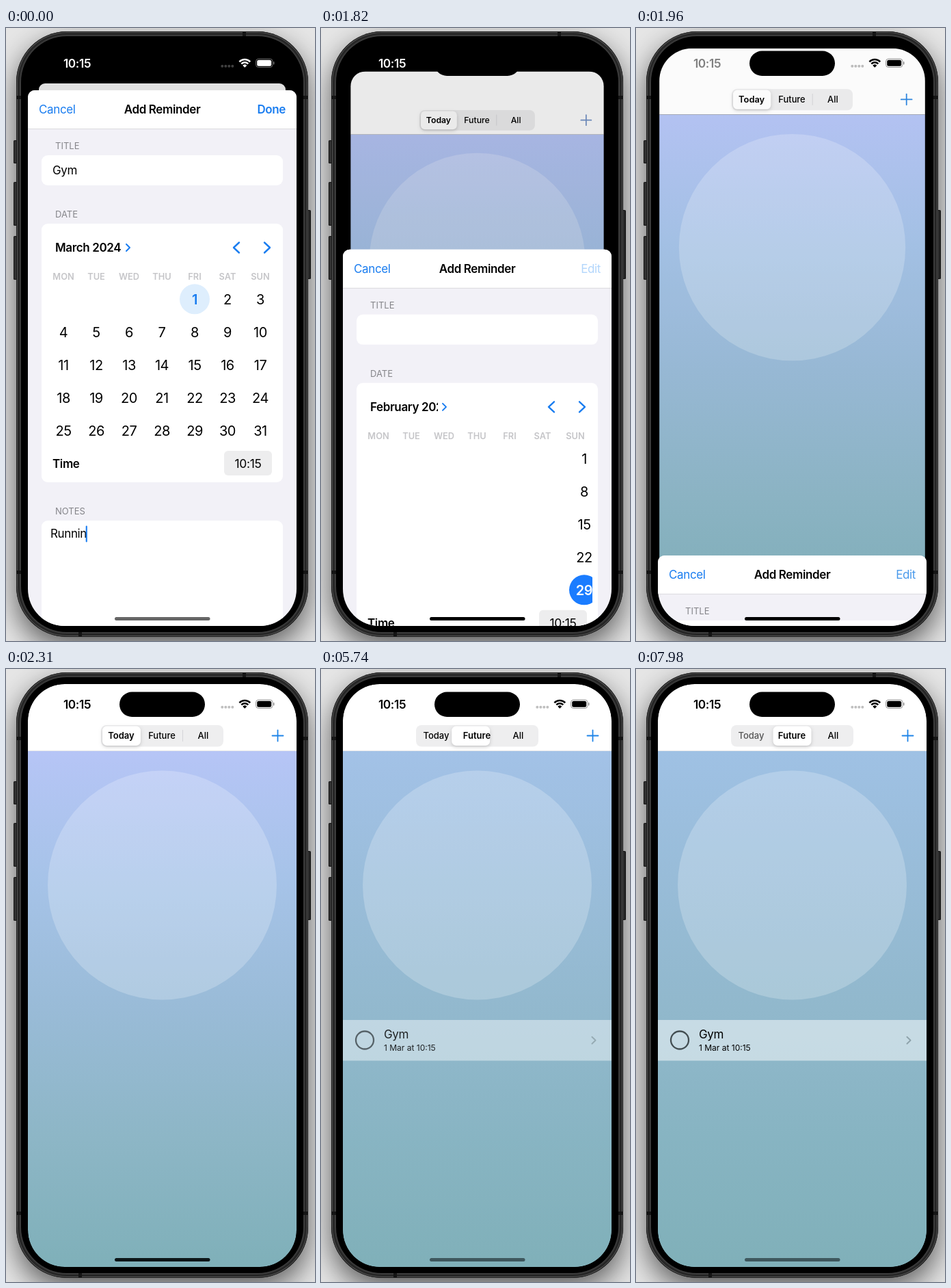
An HTML page with a canvas for the animation above (8 s loop, 452x896 px).

```html
<!DOCTYPE html>
<html lang="en">
<head>
<meta charset="utf-8">
<title>Reminders</title>
<style>
  html, body { margin: 0; width: 100%; height: 100%; overflow: hidden; background: #ddd; }
  canvas { display: block; }
</style>
</head>
<body>
<canvas id="stage" width="452" height="896"></canvas>
<script>
const ctx = document.getElementById('stage').getContext('2d');
const LOOP = 8000, STEP = 70;
const BLUE = '#1a7df0';
const MID = 228.5;

const clamp = v => Math.max(0, Math.min(1, v));
const lerp = (a, b, p) => a + (b - a) * p;
const mix = (a, b, p) => `rgb(${a.map((v, i) => Math.round(lerp(v, b[i], p)))})`;

// Critically damped spring from 0 to 1; time in ms, speed per second
function spring(ms, speed) {
  const x = Math.max(0, ms) * speed / 1000;
  return 1 - (1 + x) * Math.exp(-x);
}

function box(x, y, w, h, r, fill) {
  ctx.beginPath();
  ctx.roundRect(x, y, w, h, r);
  if (fill) {
    ctx.fillStyle = fill;
    ctx.fill();
  }
}

function disc(x, y, r, fill) {
  ctx.beginPath();
  ctx.arc(x, y, r, 0, 7);
  ctx.fillStyle = fill;
  ctx.fill();
}

function line(points, color, width) {
  ctx.beginPath();
  points.forEach(([x, y]) => ctx.lineTo(x, y));
  ctx.strokeStyle = color;
  ctx.lineWidth = width;
  ctx.lineCap = ctx.lineJoin = 'round';
  ctx.stroke();
}

// y is the middle of the capital letters
function text(str, x, y, size, weight = 400, color = '#000', align = 'left') {
  ctx.font = `${weight} ${size}px Inter, sans-serif`;
  ctx.letterSpacing = (size > 13 ? -0.022 * size : 0) + 'px';
  ctx.textAlign = align;
  ctx.fillStyle = color;
  ctx.fillText(str, x, y + size * 0.364);
}

// dir 1 points right, -1 points left
function chevron(x, y, w, h, dir, color, width) {
  line([[x - w * dir, y - h], [x + w * dir, y], [x - w * dir, y + h]], color, width);
}

function clipped(path, draw) {
  ctx.save();
  path();
  ctx.clip();
  draw();
  ctx.restore();
}

function gradient(colors) {
  const g = ctx.createLinearGradient(0, 120, 0, 874);
  colors.forEach((c, i) => g.addColorStop(i / (colors.length - 1), c));
  return g;
}
const todaySky = gradient(['#b6c5f6', '#a6c3e8', '#99bbd7', '#8db6c6', '#7fb0b9']);
const futureSky = gradient(['#9fc1e4', '#98bcd8', '#91b8cc', '#87b4c2', '#80b0b9']);

function drawPhone() {
  ctx.fillStyle = '#e6e6e6';
  ctx.fillRect(0, 0, 452, 896);
  ctx.save();
  ctx.shadowColor = 'rgba(0,0,0,.6)';
  ctx.shadowBlur = 42;
  ctx.shadowOffsetY = 16;
  box(15, 5, 427, 885, 74, '#222');
  ctx.restore();
  for (const [x, y, h] of [[11, 164, 34], [11, 225, 64], [11, 304, 64], [440, 266, 101]]) {
    box(x, y, 6, h, 1.5, '#1b1b1b');
    box(x + 1.5, y + 1, 2, h - 2, 1, '#3c3c3c');
  }
  box(15, 5, 427, 885, 74, '#1a1a1a');
  box(16, 6, 425, 883, 73, '#555');
  box(17, 7, 423, 881, 72, '#262626');
  box(20, 10, 417, 875, 69, '#3b3b3b');
  box(22, 12, 413, 871, 67, '#000');
  ctx.fillStyle = '#141414';
  for (const y of [99, 793]) {
    ctx.fillRect(16, y, 6, 5);
    ctx.fillRect(435, y, 6, 5);
  }
  ctx.fillRect(346, 6, 5, 6);
  ctx.fillRect(106, 883, 5, 6);
}

function drawSegments(t, p) {
  box(139, 82, 179, 31.5, 8, '#eeeeef');
  if (p < 0.5) {
    ctx.fillStyle = '#d5d5d8';
    ctx.fillRect(258, 89, 1, 17);
  }
  ctx.save();
  ctx.shadowColor = 'rgba(0,0,0,.18)';
  ctx.shadowBlur = 5;
  ctx.shadowOffsetY = 2;
  box(lerp(141, 200.5, p), 83.5, 56, 28.5, 6.5, '#fff');
  ctx.restore();
  const pressed = '#555';
  text('Today', 168.5, 97.7, 13, p < 0.5 ? 600 : 500, t >= 7980 ? pressed : '#000', 'center');
  text('Future', 228, 97.7, 13, p < 0.5 ? 500 : 600, t >= 5530 && p < 0.5 ? pressed : '#000', 'center');
  text('All', 288.5, 97.7, 13, 500, '#000', 'center');
}

function drawList(t, open, future) {
  ctx.fillStyle = '#fff';
  ctx.fillRect(32, 22, 393, 98);
  ctx.fillStyle = todaySky;
  ctx.fillRect(32, 120, 393, 754);
  ctx.globalAlpha = future;
  ctx.fillStyle = futureSky;
  ctx.fillRect(32, 120, 393, 754);
  ctx.globalAlpha = 1;
  ctx.fillStyle = 'rgba(0,0,0,.12)';
  ctx.fillRect(32, 119.3, 393, 0.7);
  disc(MID, 316, 167.5, 'rgba(255,255,255,.22)');
  drawSegments(t, future);

  const tint = mix([151, 153, 187], [30, 132, 232], open);
  line([[389.5, 97.5], [405.5, 97.5]], tint, 1.8);
  line([[397.5, 89.5], [397.5, 105.5]], tint, 1.8);

  ctx.globalAlpha = future;
  ctx.fillStyle = 'rgba(255,255,255,.5)';
  ctx.fillRect(32, 513, 393, 59.5);
  ctx.beginPath();
  ctx.arc(64, 542.5, 13, 0, 7);
  ctx.strokeStyle = '#434e52';
  ctx.lineWidth = 2.3;
  ctx.stroke();
  text('Gym', 92, 534, 17);
  text('1 Mar at 10:15', 92, 554, 12);
  chevron(399, 542.7, 2.6, 5, 1, '#8fa3ab', 1.9);
  ctx.globalAlpha = 1;
}

function drawCalendar(t, reset) {
  const column = i => 84 + 48 * i;
  const row = i => 396.5 + 48 * i;
  if (reset) {
    clipped(() => box(60, 300, 111, 40, 0), () => text('February 2024', 72, 321, 17, 600));
  } else {
    text('March 2024', 72, 321, 17, 600);
  }
  chevron(reset ? 180.5 : 178.5, 321, 2.5, 5, 1, BLUE, 2);
  chevron(337, 321, 4, 7.5, -1, BLUE, 2.4);
  chevron(382, 321, 4, 7.5, 1, BLUE, 2.4);
  ['MON', 'TUE', 'WED', 'THU', 'FRI', 'SAT', 'SUN'].forEach((name, i) =>
    text(name, column(i), 363.5, 12.8, 600, '#c5c5c8', 'center'));

  if (reset) {
    // The previous month slides in, one column showing
    const x = 385 + (1820 - t) * 0.4;
    clipped(() => box(60, 370, 337, 245, 0), () => {
      disc(x, row(4), 22, '#1a7cff');
      for (let i = 0; i < 5; i++) {
        text(1 + 7 * i, x, row(i), 20, i < 4 ? 400 : 600, i < 4 ? '#000' : '#fff', 'center');
      }
    });
  } else {
    disc(276, 396.3, 22, '#deeefd');
    for (let day = 1; day <= 31; day++) {
      const cell = day + 3, first = day === 1;
      text(day, column(cell % 7), row(Math.floor(cell / 7)), 20,
        first ? 600 : 400, first ? BLUE : '#000', 'center');
    }
  }
  text('Time', 68, 636.5, 17, 600);
  box(319, 618, 70, 36, 6, '#ededee');
  text('10:15', 354, 636.5, 17.5, 400, '#000', 'center');
}

function drawNotes(t) {
  const typed = t < 140 ? 'Runnin' : 'Running';
  text(typed, 65, 739, 17);
  const alpha = clamp(1 - (Math.floor((t - 1260) / STEP) + 1) / 3);
  ctx.globalAlpha = alpha;
  box(t < 140 ? 116.7 : 127, 727.5, 2.1, 24, 1, BLUE);
  ctx.globalAlpha = 1;
}

function drawSheet(t, offset) {
  const reset = t >= 1750;
  ctx.save();
  ctx.translate(0, offset);
  box(32, 91, 393, 900, 10, '#f2f1f7');
  box(32, 91, 393, 56, [10, 10, 0, 0], '#fff');
  ctx.fillStyle = '#d6d6d9';
  ctx.fillRect(32, 147, 393, 0.8);
  text('Cancel', 48, 119.3, 17, 400, BLUE);
  text('Add Reminder', MID, 119.3, 17, 600, '#000', 'center');
  if (reset) {
    const shade = mix([178, 214, 252], [74, 154, 235], clamp((t - 1820) / 140));
    text('Edit', 409, 119.3, 17, 400, shade, 'right');
  } else {
    text('Done', 409, 119.3, 17, 600, t < 1540 ? BLUE : '#a9cff8', 'right');
  }
  const label = '#85858a';
  text('TITLE', 72, 172, 13, 400, label);
  text('DATE', 72, 272, 13, 400, label);
  text('NOTES', 72, 706.5, 13, 400, label);
  box(52, 186, 353, 44, 9, '#fff');
  box(52, 286, 353, 378, 9, '#fff');
  box(52, 720, 353, 200, 9, '#fff');
  if (!reset) text('Gym', 68, 208.3, 17);
  drawCalendar(t, reset);
  drawNotes(t);
  ctx.restore();
}

function drawStatus(t) {
  box(166, 33.5, 125, 36.5, 18.3, '#000');
  const fade = clamp((t - 1820) / 280);
  text('10:15', 104, 51.5, 17.3, 600, mix([255, 255, 255], [0, 0, 0], fade), 'center');

  const ink = t < 1680 ? '#fff' : '#000';
  ctx.globalAlpha = 0.25;
  for (let i = 0; i < 4; i++) disc(316.3 + 5 * i, 55.7, 2, ink);
  ctx.globalAlpha = 1;
  const spread = Math.PI / 4.1, up = -Math.PI / 2;
  ctx.lineCap = 'butt';
  ctx.strokeStyle = ink;
  ctx.lineWidth = 2.5;
  for (const r of [11.4, 7.2]) {
    ctx.beginPath();
    ctx.arc(349.3, 57.5, r, up - spread, up + spread);
    ctx.stroke();
  }
  ctx.beginPath();
  ctx.moveTo(349.3, 57.8);
  ctx.arc(349.3, 57.8, 4.4, up - spread, up + spread);
  ctx.fillStyle = ink;
  ctx.fill();

  ctx.globalAlpha = 0.4;
  box(365.5, 45, 24.5, 12.5, 4);
  ctx.lineWidth = 1;
  ctx.stroke();
  box(391, 49, 1.5, 4.5, 1, ink);
  ctx.globalAlpha = 1;
  box(367.2, 46.7, 21, 9, 2.5, ink);
}

function homeColor(t) {
  if (t < 1680) return '#666';
  if (t < 2310) return '#000';
  return t < 5600 ? '#0c1517' : '#3e575d';
}

function draw(t) {
  const open = t >= 2310 ? 1 : spring(t - 1757.7, 17.5);
  const future = t >= 5950 ? 1 : spring(t - 5545, 17);
  const scale = lerp(0.9186, 1, open);

  drawPhone();
  clipped(() => box(32, 22, 393, 852, 54), () => {
    ctx.fillStyle = '#000';
    ctx.fillRect(32, 22, 393, 852);
    ctx.save();
    ctx.translate(MID, lerp(81, 22, open));
    ctx.scale(scale, scale);
    ctx.translate(-MID, -22);
    clipped(() => box(32, 22, 393, 852, lerp(10, 54, open)), () => {
      drawList(t, open, future);
      ctx.fillStyle = `rgba(0,0,0,${0.12 * (1 - open)})`;
      ctx.fillRect(32, 22, 393, 852);
    });
    ctx.restore();
    if (open < 1) drawSheet(t, 783 * open);
  });
  drawStatus(t);
  box(159, 861, 139.5, 5, 2.5, homeColor(t));
}

function tick() {
  const t = performance.now() % LOOP;
  draw(Math.floor(t / STEP) * STEP);
  requestAnimationFrame(tick);
}
tick();
</script>
</body>
</html>
```
